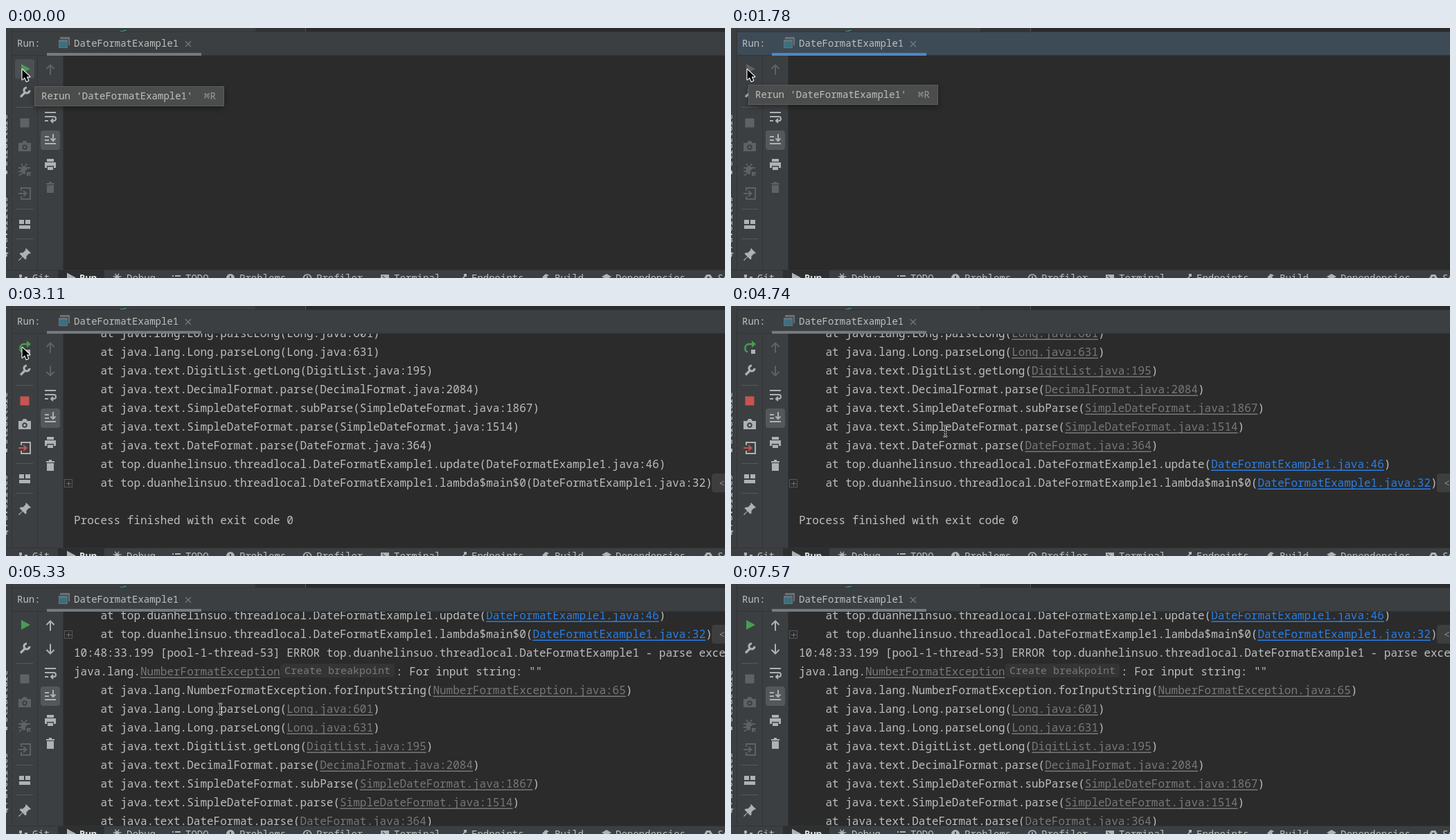
An HTML page with a canvas that plays this animation: 1038x361 px, repeating every 9.07 s.

```html
<!DOCTYPE html>
<html lang="en">
<head>
<meta charset="utf-8">
<title>Run console</title>
<style>
html, body { margin: 0; height: 100%; overflow: hidden; background: #2b2b2b; }
canvas { display: block; }
</style>
</head>
<body>
<canvas id="stage" width="1038" height="361"></canvas>
<script>
const ctx = document.getElementById('stage').getContext('2d');
const LOOP = 9070, CHAR = 9.6, LINE = 27;
const PANEL = '#3c3f41', EDGE = '#323435', CONSOLE = '#2b2b2b', TEXT = '#bebebe';
const FOCUS = '#3d4b57', ON = '#afb1b3', OFF = '#5f6264', GREEN = '#499c54', RED = '#c75450';

const PKG = 'top.duanhelinsuo.threadlocal.DateFormatExample1';
const COMMAND = '/Library/Java/JavaVirtualMachines/jdk1.8.0_291.jdk/Contents/Home/bin/java ...';
// Braces mark links; a line with + can be unfolded.
const TRACE = [
  'java.lang.{NumberFormatException}|: For input string: ""',
  '    at java.lang.NumberFormatException.forInputString({NumberFormatException.java:65})',
  '    at java.lang.Long.parseLong({Long.java:601})',
  '    at java.lang.Long.parseLong({Long.java:631})',
  '    at java.text.DigitList.getLong({DigitList.java:195})',
  '    at java.text.DecimalFormat.parse({DecimalFormat.java:2084})',
  '    at java.text.SimpleDateFormat.subParse({SimpleDateFormat.java:1867})',
  '    at java.text.SimpleDateFormat.parse({SimpleDateFormat.java:1514})',
  '    at java.text.DateFormat.parse({DateFormat.java:364})',
  `    at ${PKG}.update({DateFormatExample1.java:46})`,
  `    at ${PKG}.lambda$main$0({DateFormatExample1.java:32})+`
];
const LOG = [
  ...TRACE.slice(-2),
  `10:48:33.199 [pool-1-thread-53] ERROR ${PKG} - parse exception:`,
  ...TRACE, '', 'Process finished with exit code 0'
];
const LOG_TOP = -90;

const ICONS = {
  play: { fill: 'M-5-7.5L8-.5L-5 6.5z' },
  rerun: { fill: 'M3-10L9-5L3 0z', line: 'M-3 6.5A6 6 0 0 1-1-5H4', width: 2.4 },
  wrench: { line: 'M-6 6.5L1-.5M3-7A4 4 0 1 0 7-3', width: 3.2 },
  stop: { fill: 'M-6.5-6.5H6.5V6.5H-6.5z' },
  camera: { fill: 'M-9-5h5l2-3h4l2 3h5v12h-18zM0-2.8a3.8 3.8 0 1 0 .01 0zM0-.8a1.8 1.8 0 1 0 .01 0z' },
  bug: { fill: 'M-1-6a4.5 6 0 0 1 4.5 6H1V6H-1a4.5 6 0 0 1 0-12zM3 3H9V5H6.5L9 8L8 9L5 6.5V9H3z',
    line: 'M-5-9L-3-6M3-9L1-6M-9-3H-4M2-3H8M-9 2H-4M-8 8L-4 5', width: 2 },
  frame: { line: 'M-5-4V-8H8V8H-5V4', width: 2 },
  enter: { line: 'M-9 0H2M-2-4L2.5 0L-2 4', width: 2 },
  layout: { fill: 'M-8-6H-1V0H-8zM1-6H8V0H1zM-8 2H8V7H-8z' },
  pin: { fill: 'M2-9L9-2L7.5-1L6.5-1.5L2.5 2.5V6L1 7.5L-3 3.5L-8 9L-9 8L-3.5 3L-7.5-1L-6-2.5H-2.5L1.5-6.5L1-7.5z' },
  up: { line: 'M0 7.5V-6M-5.5-1L0-6.5L5.5-1', width: 2 },
  down: { line: 'M0-7.5V6M-5.5 1L0 6.5L5.5 1', width: 2 },
  wrap: { line: 'M-8-6H8M-8 0H5a3 3 0 0 1 0 6H1M4 3L1 6L4 9M-8 6H-3', width: 2 },
  toEnd: { line: 'M-8 6H8M-8-4H-2M-8 1H-2M4-8V2M.5-1.5L4 2L7.5-1.5', width: 2 },
  print: { fill: 'M-5-8H5V-4H-5zM-8-3H8V5H5V2H-5V5H-8zM-4 3.5H4V8H-4z' },
  trash: { fill: 'M-6-6H-2V-8H2V-6H6V-4H-6zM-5-3H5V8H-5z' },
  branch: { fill: 'M-6-5h4v4h-4zM2-2h4v4H2z', line: 'M-4-3V6M4 0V5', width: 2 },
  list: { line: 'M-6-3H-4M-2-3H6M-6 1H-4M-2 1H6', width: 2 },
  alert: { fill: 'M0-6a6 6 0 1 0 .01 0zM-1-3H1V2H-1z' },
  clock: { line: 'M0-5a5.5 5.5 0 1 0 .01 0M0-3V1H3', width: 1.7 },
  terminal: { fill: 'M-6-5H6V6H-6zM-4-3L-1 0L-4 3L-3 3.5L.5 0L-3-3.5z' },
  nodes: { fill: 'M2-6h4v4h-4zM-6 0h4v4h-4z', line: 'M3-2L0 1H-4', width: 1.7 },
  hammer: { fill: 'M-5-1L0-6L5-4L2-2L3 0L-3 6L-5 4L0-1L-2 1z' },
  layers: { fill: 'M0-6L7-2L0 2L-7-2zM-7 1L0 5L7 1V3L0 7L-7 3z' },
  hexagon: { fill: 'M-3-5H3L6 0L3 5H-3L-6 0zM-1.5-2h3v3h-3z' },
  arrow: { fill: 'M0 0V14.5L3.5 11.3L6 17L8.7 15.8L6.3 10.3H10.8z' },
  beam: { line: 'M-3-8Q0-8 0-6Q0-8 3-8M0-6V6M-3 8Q0 8 0 6Q0 8 3 8M-2 2H2', width: 1 },
  hand: { fill: 'M4.5 1.5Q6-.5 7 1.5V6Q9 5 9.5 6.5Q11.5 5.7 12 7.5Q14 7 14 9V12L12.5 16.5H6L1 10.5Q.5 8.5 3 9L4.5 10.5z' }
};
for (const shape of Object.values(ICONS)) {
  if (shape.fill) shape.fill = new Path2D(shape.fill);
  if (shape.line) shape.line = new Path2D(shape.line);
}

function rect(x, y, w, h, color) {
  ctx.fillStyle = color;
  ctx.fillRect(x, y, w, h);
}
function rounded(x, y, w, h, r, color) {
  ctx.fillStyle = color;
  ctx.beginPath();
  ctx.roundRect(x, y, w, h, r);
  ctx.fill();
}
function text(str, x, y, color = TEXT, size = 14, weight = 400) {
  ctx.font = `${weight} ${size}px "Noto Sans Mono", "DejaVu Sans Mono", monospace`;
  ctx.fillStyle = color;
  ctx.fillText(str, x, y);
}
function icon(name, x, y, color = ON, scale = 1) {
  const { fill, line, width } = ICONS[name];
  ctx.save();
  ctx.translate(x, y);
  ctx.scale(scale, scale);
  ctx.fillStyle = ctx.strokeStyle = color;
  ctx.lineWidth = width;
  if (fill) ctx.fill(fill, 'evenodd');
  if (line) ctx.stroke(line);
  ctx.restore();
}
function pointer(name, x, y) {
  const { fill, line } = ICONS[name];
  ctx.save();
  ctx.translate(x, y);
  ctx.strokeStyle = '#fff';
  ctx.lineWidth = 2.2;
  ctx.lineJoin = 'round';
  ctx.stroke(fill || line);
  ctx.restore();
  icon(name, x, y, '#000');
}
// Value of the last [time, value] pair that has begun.
function at(t, steps) {
  return steps.reduce((value, [start, next]) => t >= start ? next : value, undefined);
}

function logLine(line, y, links) {
  let x = 98, linked = false;
  for (const part of line.split(/([{}|+])/)) {
    if (part === '{' || part === '}') linked = part === '{';
    else if (part === '|') {
      if (!links) continue;
      rounded(396, y - 17, 165, 20, 4, '#343434');
      text('Create breakpoint', 402, y - 2, '#7a7a7a', 15);
      x = 563;
    } else if (part === '+') {
      ctx.strokeStyle = '#56595b';
      ctx.lineWidth = 1;
      ctx.strokeRect(84.5, y - 10.5, 11, 11);
      rect(87, y - 5, 7, 1, '#6c6f71');
      rect(90, y - 8, 1, 7, '#6c6f71');
      rounded(1019, y - 19, 40, 27, 4, '#3c3e3f');
      text('<', 1029, y, '#8c8c8c', 15);
    } else if (part) {
      const width = part.length * CHAR;
      const color = !linked || !links ? TEXT : part.startsWith('DateFormatEx') ? '#2a7fe5' : '#787878';
      text(part, x, y, color, 16, 500);
      if (linked && links) rect(x, y + 2.5, width, 1.5, color);
      x += width;
    }
  }
}

function drawConsole(t) {
  rect(83, 40, 955, 309, CONSOLE);
  ctx.save();
  ctx.beginPath();
  ctx.rect(83, 40, 955, 309);
  ctx.clip();
  if (t >= 890 && t < 1480) rect(98.5, 43, 2, 22, TEXT);
  if (t >= 2370 && t < 2960) text(COMMAND, 98, 60, TEXT, 16, 500);
  if (t >= 2960) {
    const scroll = at(t, [[0, 54], [3110, 0], [4890, 20], [5030, 73], [5180, 115], [5330, 141]]);
    const shown = t < 3110 ? LOG.slice(0, -1) : LOG;
    shown.forEach((line, i) => logLine(line, LOG_TOP + i * LINE + scroll, t >= 3860));
  }
  ctx.restore();
}

function drawHeader(t) {
  const leftBlue = t >= 890 && t < 2070, rightBlue = t >= 890 && t < 2220;
  const tabColor = leftBlue ? FOCUS : PANEL;
  rect(9, 6, 276, 33, tabColor);
  rect(285, 6, 753, 33, rightBlue ? FOCUS : PANEL);
  rect(9, 39, 1029, 1, EDGE);
  rect(59, 36, 223, 4, leftBlue ? '#4a88c7' : '#747a80');
  text('Run:', 16, 27);
  const running = t >= 2070 && t < 2960;
  const frameColor = running ? '#8d989f' : '#687277';
  rect(78, 13, 14, 12, frameColor);
  rect(75, 16, 15, 14, tabColor);
  rect(76, 17, 13, 12, frameColor);
  rect(77, 20, 11, 8, running ? '#40a0b8' : '#3b6f80');
  if (running) rounded(86, 24, 6, 6, 3, GREEN);
  text('DateFormatExample1', 98, 27);
  ctx.strokeStyle = '#777b7e';
  ctx.lineWidth = 1.2;
  ctx.stroke(new Path2D('M259 19L267 27M267 19L259 27'));
}

function drawToolbars(t) {
  rect(9, 40, 74, 309, PANEL);
  rect(45, 40, 1, 309, EDGE);
  rect(82, 40, 1, 309, EDGE);
  const compact = t >= 2070 && t < 4890, running = t >= 2510 && t < 4890;
  const live = running ? ON : OFF, lift = compact ? 34 : 0;
  if (t < 1180) rounded(13, 45, 28, 28, 4, '#4c5052');
  if (running) {
    icon('rerun', 27, 60, GREEN);
    rect(29, 63, 6, 6, ON);
  } else icon('play', 27, 59.5, t < 1180 || t >= 4890 ? GREEN : OFF);
  icon('wrench', 27, 93);
  icon('stop', 27, 137, running ? RED : OFF);
  icon('camera', 27, 171, live);
  if (!compact) icon('bug', 27, 205, OFF);
  icon('frame', 27, 239 - lift, live);
  icon('enter', 27, 239 - lift, running ? RED : OFF);
  icon('layout', 27, 283 - lift);
  icon('pin', 27, 327 - lift);
  for (const y of [114, 261 - lift, 304 - lift]) rect(15, y, 24, 1, '#56595b');

  const nav = t >= 4890 ? ON : OFF;
  icon('up', 64, 60, nav);
  icon('down', 64, 94, nav);
  icon('wrap', 64, 128);
  rounded(50, 148, 28, 28, 4, '#54585a');
  icon('toEnd', 64, 161);
  icon('print', 64, 197);
  icon('trash', 64, 230, t >= 2510 ? ON : OFF);
}

function drawSurroundings() {
  rect(0, 0, 1038, 361, PANEL);
  rect(360, 0, 678, 5, '#313335');
  rect(433, 0, 605, 5, CONSOLE);
  rect(432, 0, 1, 5, '#555');
  rect(165, 4, 6, 1, GREEN);
  rect(170, 3, 4, 1, '#3b8fa8');
  rect(9, 5, 1029, 1, EDGE);
  rect(8, 0, 1, 349, EDGE);
  for (const [label, y] of [['Structure', 200], ['Favorites', 319]]) {
    ctx.save();
    ctx.translate(1.5, y);
    ctx.rotate(-Math.PI / 2);
    text(label, 0, 0);
    ctx.restore();
  }
  rect(0, 206, 2, 5, ON);
  icon('hammer', -1, 329);
}

function drawStatusBar() {
  rect(0, 349, 1038, 12, PANEL);
  rect(0, 349, 1038, 1, EDGE);
  rect(75, 350, 67, 11, '#2d2f30');
  const tabs = [
    ['Git', 38, 'branch'], ['Run', 106, 'play'], ['Debug', 174, 'bug'], ['TODO', 259, 'list'],
    ['Problems', 337, 'alert'], ['Profiler', 448, 'clock'], ['Terminal', 560, 'terminal'],
    ['Endpoints', 672, 'nodes'], ['Build', 792, 'hammer'], ['Dependencies', 880, 'layers'],
    ['Services', 1027, 'hexagon']
  ];
  for (const [label, x, name] of tabs) {
    const active = label === 'Run';
    icon(name, x - 13, 361, ON, name === 'bug' ? 0.7 : 1);
    text(label, x, 366, active ? '#e0e0e0' : TEXT, 14, active ? 600 : 400);
  }
}

function drawTooltip(x, y) {
  ctx.save();
  ctx.shadowColor = 'rgba(0,0,0,.35)';
  ctx.shadowBlur = 8;
  ctx.shadowOffsetY = 3;
  rect(x, y, 274, 29, '#5b5d5e');
  ctx.restore();
  rect(x + 1, y + 1, 272, 27, '#4b4d4d');
  text("Rerun 'DateFormatExample1'", x + 10, y + 19, '#bfbfbf');
  text('⌘R', x + 245, y + 19, '#999');
}

function draw() {
  const t = performance.now() % LOOP;
  drawSurroundings();
  drawConsole(t);
  drawToolbars(t);
  drawHeader(t);
  drawStatusBar();
  if (t < 590) drawTooltip(41, 84);
  if (t >= 1780 && t < 2070) drawTooltip(25, 82);
  const cursor = at(t, [
    [0, ['arrow', 23.5, 60]], [4300, ['arrow', 33.5, 64]], [4450, ['beam', 255.5, 158.5]],
    [4600, ['beam', 308.5, 180.5]], [4740, ['beam', 309.5, 180.5]], [7130, ['beam', 311.5, 180.5]],
    [7420, ['hand', 441, 203]], [7570, null]
  ]);
  if (cursor) pointer(...cursor);
  requestAnimationFrame(draw);
}
draw();
</script>
</body>
</html>
```
